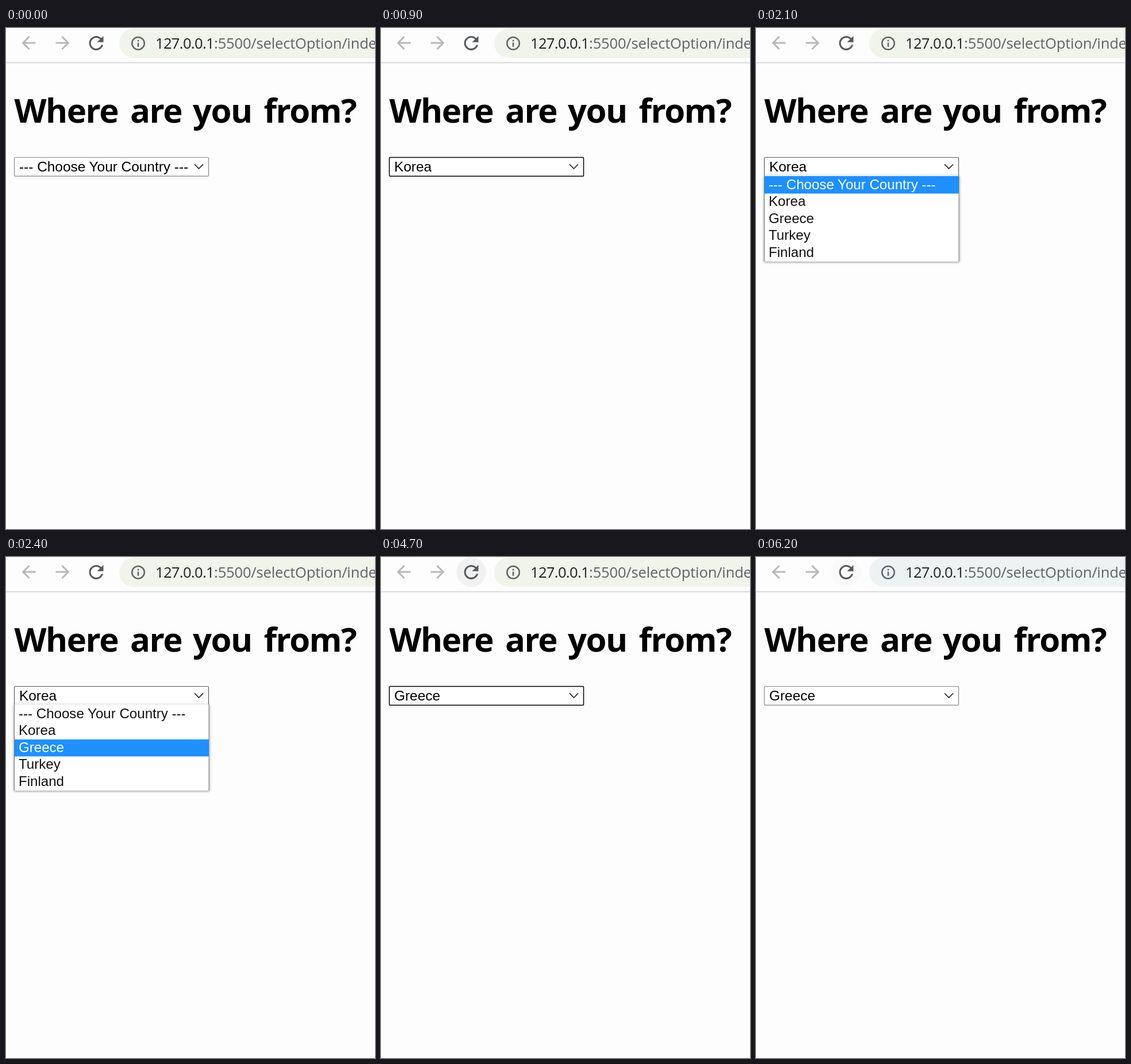
An HTML page that plays this animation: 642 px wide and 873 px high, repeating every 6600 ms.

```html
<!DOCTYPE html>
<html lang="en">
<head>
<meta charset="utf-8">
<title>Where are you from?</title>
<style>
  html, body { margin: 0; width: 100%; height: 100%; overflow: hidden; background: #fdfdfd; }
  svg { display: block; width: 642px; height: 873px; }
  text { white-space: pre; }
  .heading { font: bold 58px "Open Sans", "Noto Sans", sans-serif; letter-spacing: -1.5px; }
  .address { font: 25.5px "Open Sans", "Noto Sans", sans-serif; letter-spacing: -.15px; fill: #5f6368; }
  .host { letter-spacing: -.65px; fill: #202124; }
  .value { font: 24.4px "Liberation Sans", Arial, sans-serif; }
  .option { font: 24.1px "Liberation Sans", Arial, sans-serif; }
  #popup { filter: drop-shadow(0 1px 2px rgba(0, 0, 0, .45)); }
</style>
</head>
<body>
<svg viewBox="0 0 642 873">
  <defs>
    <path id="arrow" d="M20 11H7.83l5.59-5.59L12 4l-8 8 8 8 1.41-1.41L7.83 13H20z"/>
  </defs>
  <rect width="642" height="873" fill="#fdfdfd"/>

  <use href="#arrow" transform="translate(21.5 8) scale(1.5)" fill="#b6b8ba"/>
  <use href="#arrow" transform="translate(116.5 8) scale(-1.5 1.5)" fill="#b6b8ba"/>
  <circle id="hover" cx="157" cy="26.5" r="25.7"/>
  <circle id="ripple" cx="146" cy="24" r="14" fill="#e4e4e4"/>
  <path transform="translate(138.3 7.7) scale(1.56)" fill="#56595d" d="M17.65 6.35C16.2 4.9 14.21 4 12 4c-4.42 0-7.99 3.58-7.99 8s3.57 8 7.99 8c3.73 0 6.84-2.55 7.73-6h-2.08c-.82 2.33-3.04 4-5.65 4-3.31 0-6-2.69-6-6s2.69-6 6-6c1.66 0 3.14.69 4.22 1.78L13 11h7V4z"/>
  <rect id="bar" x="197" y="1" width="480" height="51" rx="25.5"/>
  <g fill="none" stroke="#5f6368" stroke-width="2.5">
    <circle cx="230" cy="26.8" r="10.8"/>
    <path d="M230 20.8v2.6M230 25.5v7.2"/>
  </g>
  <text class="address" x="260" y="36"><tspan class="host">127.0.0.1</tspan>:5500/selectOption/index.html</text>
  <rect y="59.5" width="642" height="2" fill="#d9d9dd"/>

  <text class="heading" y="165"><tspan x="14.5">Where</tspan><tspan x="216">are</tspan><tspan x="325">you</tspan><tspan x="448.5">from?</tspan></text>

  <rect id="box" x="14.5" y="225.5" width="338" height="32.7" rx="1.5" fill="#fff"/>
  <text id="value" class="value" x="23" y="250"></text>
  <path d="M328 237.5l7.5 7.5 7.5-7.5" fill="none" stroke="#222" stroke-width="1.7"/>

  <g id="popup">
    <rect x="14" y="257" width="339.5" height="150" fill="#fff"/>
    <path d="M14.5 257v150M353 257v150" stroke="#777"/>
    <rect id="highlight" x="15" width="338" fill="#1e90ff"/>
  </g>
</svg>
<script>
  const LOOP = 6600;
  const options = ["--- Choose Your Country ---", "Korea", "Greece", "Turkey", "Finland"];
  const IDLE = "#858585", HOVER = "#5c5c5c", FOCUS = "#000";

  // start time, chosen option, border, popup opacity, highlighted option
  const steps = [
    [0, 0, IDLE, 0, 0],
    [100, 0, HOVER, 0, 0],
    [300, 0, HOVER, .5, 0],
    [400, 0, HOVER, 1, 0],
    [600, 0, HOVER, 1, 1],
    [900, 1, FOCUS, 0, 1],
    [1900, 1, HOVER, 0, 1],
    [2000, 1, HOVER, .6, 1],
    [2100, 1, HOVER, 1, 0],
    [2200, 1, HOVER, 1, 1],
    [2400, 1, HOVER, 1, 2],
    [2900, 2, FOCUS, 0, 2],
    [5200, 2, IDLE, 0, 2]
  ];

  const el = id => document.getElementById(id);
  const set = (node, attrs) => {
    for (const name in attrs) node.setAttribute(name, attrs[name]);
  };

  const rows = options.map((label, i) => {
    const row = document.createElementNS("http://www.w3.org/2000/svg", "text");
    set(row, { class: "option", x: 22, y: 280.5 + 29.6 * i });
    row.textContent = label;
    el("popup").append(row);
    return row;
  });

  function render(t) {
    const [, chosen, border, opacity, active] = steps.findLast(step => t >= step[0]);
    el("value").textContent = options[chosen];
    set(el("box"), { stroke: border, "stroke-width": border === FOCUS ? 1.5 : 1.2 });
    set(el("popup"), { opacity });
    set(el("highlight"), { y: active ? 258.7 + 29.6 * active : 258, height: active ? 29.6 : 30.5 });
    rows.forEach((row, i) => set(row, { fill: i === active ? "#fff" : "#111" }));

    // reload button and address bar settle in three 100 ms steps
    const fade = Math.min(3, Math.max(0, Math.floor((t - 5900) / 100))) / 3;
    const grey = 241 + 9 * fade;
    set(el("hover"), { fill: `rgb(${grey},${grey},${grey})`, opacity: t >= 4700 ? 1 : 0 });
    set(el("ripple"), { opacity: t >= 5000 ? 1 - fade : 0 });
    set(el("bar"), { fill: `rgb(${241 - 2 * fade},${244 - 2 * fade},${234 + 8 * fade})` });
  }

  const start = performance.now();
  function tick() {
    render((performance.now() - start) % LOOP);
    requestAnimationFrame(tick);
  }
  tick();
</script>
</body>
</html>
```
